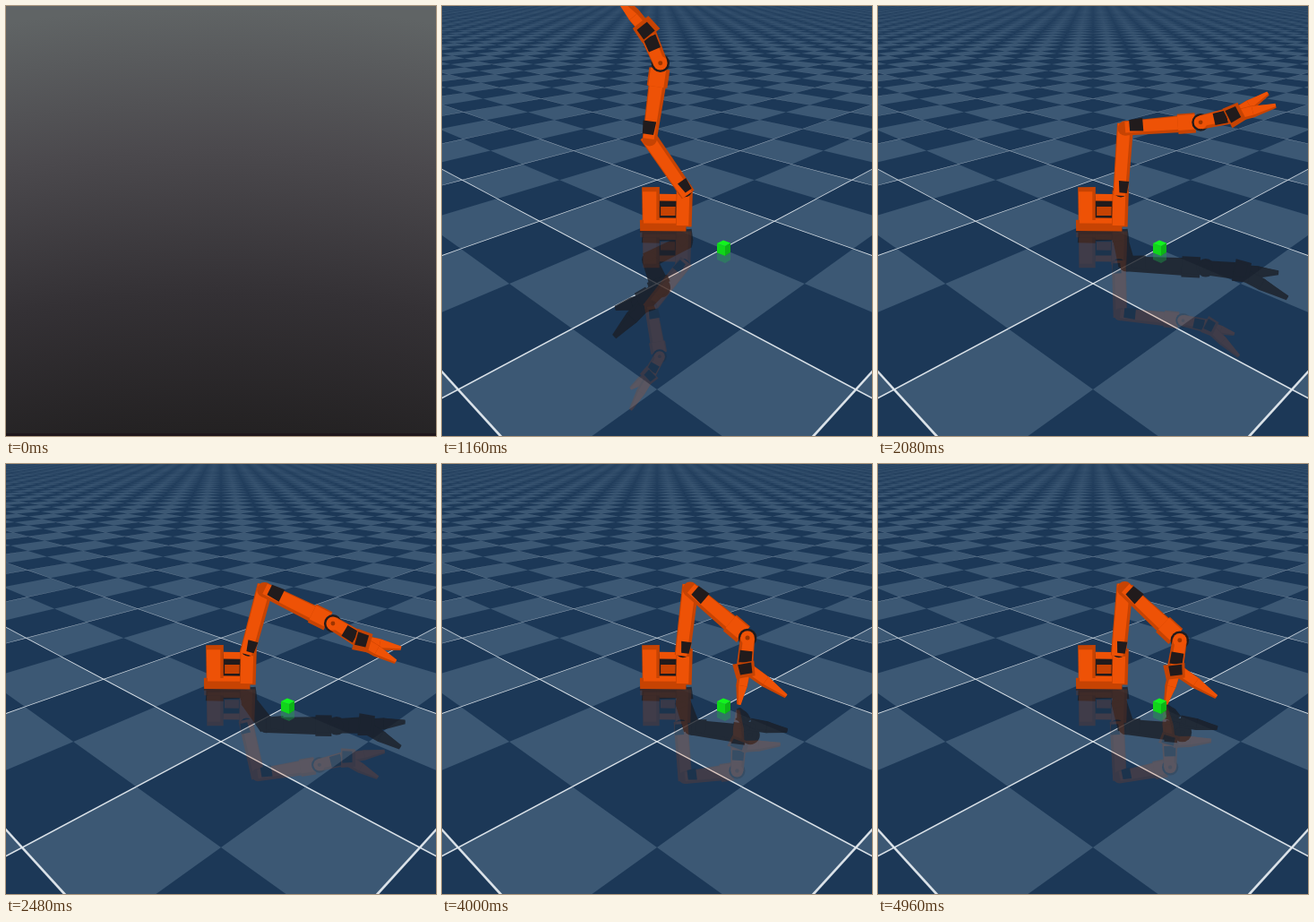
These frames come from a looping animation (480 px wide and 480 px high, 5 s). An HTML page with a canvas:

```html
<!DOCTYPE html>
<html>
<head>
<meta charset="utf-8">
<title>Robot arm</title>
<style>
  html, body { margin: 0; width: 100%; height: 100%; overflow: hidden; background: #1c3857; }
  canvas { display: block; width: 480px; height: 480px; }
</style>
</head>
<body>
<canvas id="stage" width="480" height="480"></canvas>
<script>
const SIZE = 480, LOOP = 5000, STEP = 40;
const FOCAL = 240 / Math.tan(Math.PI / 8), TILT = Math.PI * 25 / 180;
const SIN = Math.sin(TILT), COS = Math.cos(TILT);
const ORANGE = '#ee5206', SHADE = '#c64303', DEEP = '#9d3500', BLACK = '#211b1c';
const AXIS = { u: 0.13, v: 1.85 };
const stage = document.getElementById('stage').getContext('2d');

function layer() {
  const canvas = document.createElement('canvas');
  canvas.width = canvas.height = SIZE;
  return canvas.getContext('2d');
}

// World: u to the right, v away from the viewer, z up.
function project(u, v, z) {
  const k = FOCAL / (2.61 + COS * v - SIN * z);
  return { x: 240 + u * k, y: 240 + (0.847 - SIN * v - COS * z) * k, k };
}
const mirror = (u, v, z) => project(u, v, -z);
const castShadow = (u, v, z) => project(u, v - 0.68 * z, 0);

function fill(ctx, points, color) {
  ctx.fillStyle = color;
  ctx.beginPath();
  for (const p of points) ctx.lineTo(p.x, p.y);
  ctx.fill();
}

function paintFloor() {
  const ctx = layer();
  ctx.fillStyle = '#1c3857';
  ctx.fillRect(0, 0, SIZE, SIZE);
  const ground = (a, b) => project((a - b) / 2, (a + b) / 2, 0);
  const tile = (a0, b0, a1, b1, color) =>
    fill(ctx, [ground(a0, b0), ground(a1, b0), ground(a1, b1), ground(a0, b1)], color);
  const eachTile = draw => {
    for (let a = -3; a < 75; a++)
      for (let b = -3; b < 75; b++)
        if (a + b >= -4 && a + b < 92 && Math.abs(a - b) < 7 + 0.5 * (a + b)) draw(a, b);
  };
  eachTile((a, b) => { if ((a + b) & 1) tile(a, b, a + 1, b + 1, '#3c5874'); });
  const w = 0.0075;
  eachTile((a, b) => {
    const line = `rgba(228,234,240,${Math.min(0.95, (ground(a, b).k / 130) ** 1.5)})`;
    if (a & 1) tile(a - w, b, a + w, b + 1, line);
    if (b & 1) tile(a, b - w, a + 1, b + w, line);
  });
  const haze = ctx.createLinearGradient(0, 0, 0, 55);
  haze.addColorStop(0, 'rgba(44,72,102,.6)');
  haze.addColorStop(1, 'rgba(44,72,102,0)');
  ctx.fillStyle = haze;
  ctx.fillRect(0, 0, SIZE, 55);
  return ctx.canvas;
}

function paintBlank() {
  const ctx = layer(), glow = ctx.createRadialGradient(240, 1500, 1020, 240, 1500, 1500);
  ['#232122', '#343135', '#4b494d', '#606465'].forEach((c, i) => glow.addColorStop(i / 3, c));
  ctx.fillStyle = glow;
  ctx.fillRect(0, 0, SIZE, SIZE);
  ctx.fillStyle = '#1f171c';
  ctx.fillRect(0, 477, SIZE, 3);
  return ctx.canvas;
}

// Seconds, then the angles of upper arm, forearm and wrist in degrees.
const KEYS = [
  [0.04, 98, 96, 112],
  [0.60, 138, 118, 158],
  [1.72, 100, 35, 52],
  [2.48, 77, -22, -27],
  [3.16, 78, -27, -71],
  [4.00, 84, -29, -91],
  [4.96, 85.5, -32, -95]
];

function slope(i, n) {
  const a = KEYS[i - 1], b = KEYS[i + 1];
  return a && b ? (b[n] - a[n]) / (b[0] - a[0]) : 0;
}

function smoothstep(from, to, t) {
  const s = Math.min(1, Math.max(0, (t - from) / (to - from)));
  return s * s * (3 - 2 * s);
}

// Smooth curve through the keys; the base turn, jaw and roll follow simple rules.
function poseAt(t) {
  const i = Math.max(0, KEYS.findLastIndex((key, n) => n < KEYS.length - 1 && t >= key[0]));
  const a = KEYS[i], b = KEYS[i + 1], span = b[0] - a[0];
  const s = Math.min(1, (t - a[0]) / span), blend = smoothstep(0, 1, s);
  const angle = n => a[n] + (b[n] - a[n]) * blend
    + span * s * (1 - s) * (slope(i, n) * (1 - s) - slope(i + 1, n) * s);
  const degrees = [angle(1), angle(2), angle(3),
    36 * smoothstep(1.9, 3.1, t), 40 + 8 * t, 90 * (1 - smoothstep(2.4, 3.1, t))];
  return degrees.map(d => d * Math.PI / 180);
}

function drawArm(ctx, pose, view, ink) {
  const [upper, fore, wristAngle, yaw, opening, roll] = pose;
  const cy = Math.cos(yaw), sy = Math.sin(yaw);

  // Arm space: r outward, z up, q sideways away from the viewer.
  const place = ([r, z, q]) => view(AXIS.u + r * cy + q * sy, AXIS.v - r * sy + q * cy, z);
  const heading = a => [Math.cos(a), Math.sin(a), 0];
  const add = (p, d, len) => p.map((x, i) => x + d[i] * len);
  const mix = (p, q, f) => p.map((x, i) => x + (q[i] - x) * f);

  function band(a, b, r0, r1, color, shift = 0) {
    const dx = b.x - a.x, dy = b.y - a.y, len = Math.hypot(dx, dy) || 1;
    const at = (p, w) => ({ x: p.x - dy / len * p.k * w, y: p.y + dx / len * p.k * w });
    fill(ctx, [at(a, shift + r0), at(b, shift + r1), at(b, shift - r1), at(a, shift - r0)], ink || color);
  }
  const stick = (from, to, ...style) => band(place(from), place(to), ...style);
  function disc(p, r, color) {
    const c = place(p);
    ctx.fillStyle = ink || color;
    ctx.beginPath();
    ctx.arc(c.x, c.y, r * c.k, 0, 7);
    ctx.fill();
  }
  function link(a, b, r0, r1) {
    stick(a, b, r0, r1, SHADE);
    stick(a, b, r0 * 0.75, r1 * 0.75, ORANGE, -0.008);
  }
  function finger(root, dir, len) {
    const knee = add(root, dir, len * 0.45), tip = add(root, dir, len);
    disc(knee, 0.04, SHADE);
    link(root, knee, 0.045, 0.042);
    link(knee, tip, 0.042, 0.013);
  }
  // Upright block of the fixed base.
  function block(r, low, high, half, color) {
    const at = z => view(AXIS.u + r, AXIS.v, z);
    band(at(low), at(high), half, half, color);
  }

  block(-0.04, 0.08, 0.29, 0.1, BLACK);
  block(-0.08, -0.02, 0.08, 0.19, SHADE);
  block(-0.07, 0.05, 0.1, 0.17, ORANGE);
  block(-0.18, 0.08, 0.37, 0.07, SHADE);
  block(-0.19, 0.08, 0.33, 0.055, ORANGE);
  block(-0.04, 0.25, 0.31, 0.07, ORANGE);
  block(-0.04, 0.12, 0.2, 0.06, SHADE);
  block(0.09, 0.02, 0.34, 0.065, SHADE);
  block(0.08, 0.03, 0.33, 0.05, ORANGE);

  const shoulder = [0.0915, 0.348, 0];
  const elbow = add(shoulder, heading(upper), 0.5);
  const wrist = add(elbow, heading(fore), 0.565);
  const hand = add(wrist, heading(wristAngle), 0.25);

  // The jaws open around the grip direction, in a plane turned by the roll.
  const jaw = wristAngle + 0.28, grip = heading(jaw), up = heading(jaw + Math.PI / 2);
  const side = [up[0] * Math.cos(roll), up[1] * Math.cos(roll), -Math.sin(roll)];
  const splay = a => grip.map((x, i) => x * Math.cos(a) + side[i] * Math.sin(a));

  disc(shoulder, 0.06, BLACK);
  link(mix(shoulder, elbow, -0.1), mix(shoulder, elbow, 1.07), 0.06, 0.062);
  stick(mix(shoulder, elbow, -0.05), mix(shoulder, elbow, 0.15), 0.03, 0.04, BLACK, 0.02);

  disc(elbow, 0.056, SHADE);
  link(elbow, mix(elbow, wrist, 0.9), 0.055, 0.066);
  stick(mix(elbow, wrist, 0.06), mix(elbow, wrist, 0.24), 0.042, 0.05, BLACK, -0.018);
  link(mix(elbow, wrist, 0.7), mix(elbow, wrist, 0.93), 0.075, 0.075);

  disc(wrist, 0.066, BLACK);
  link(wrist, mix(wrist, hand, 0.9), 0.052, 0.06);
  disc(wrist, 0.05, ORANGE);
  disc(wrist, 0.016, DEEP);
  stick(mix(wrist, hand, 0.4), mix(wrist, hand, 0.78), 0.045, 0.047, BLACK);

  finger(hand, splay(-0.28 * opening), 0.3);
  finger(add(hand, side, 0.035), splay(0.72 * opening), 0.33);
  stick(add(hand, grip, -0.055), add(hand, grip, 0.06), 0.08, 0.07, SHADE);
  stick(add(hand, grip, -0.045), add(hand, grip, 0.035), 0.05, 0.045, BLACK, -0.008);
}

function drawCube() {
  const face = (color, ...points) => fill(stage, points.map(([x, y]) => ({ x, y })), color);
  const left = [307, 265], front = [316, 268], right = [322, 264.5], back = [314, 261.5];
  const drop = ([x, y], h) => [x, y + h];
  face('rgba(30,170,70,.38)', drop(left, 11), drop(front, 11), drop(right, 11), drop(right, 19), drop(front, 19), drop(left, 18));
  face('#10d61a', left, front, drop(front, 11), drop(left, 10.5));
  face('#0db416', front, right, drop(right, 10.5), drop(front, 11));
  face('#12f51e', left, back, right, front);
}

const floor = paintFloor(), blank = paintBlank(), scratch = layer();

function drawGhost(pose, view, ink, alpha) {
  scratch.clearRect(0, 0, SIZE, SIZE);
  drawArm(scratch, pose, view, ink);
  stage.globalAlpha = alpha;
  stage.drawImage(scratch.canvas, 0, 0);
  stage.globalAlpha = 1;
}

function render() {
  const time = Math.floor((performance.now() - start) % LOOP / STEP) * STEP;
  if (time < STEP) {
    stage.drawImage(blank, 0, 0);
  } else {
    const pose = poseAt(time / 1000);
    stage.drawImage(floor, 0, 0);
    drawGhost(pose, castShadow, '#1b1f27', 0.8);
    drawGhost(pose, mirror, null, 0.17);
    drawArm(stage, pose, project);
    drawCube();
  }
  requestAnimationFrame(render);
}
const start = performance.now();
render();
</script>
</body>
</html>
```
